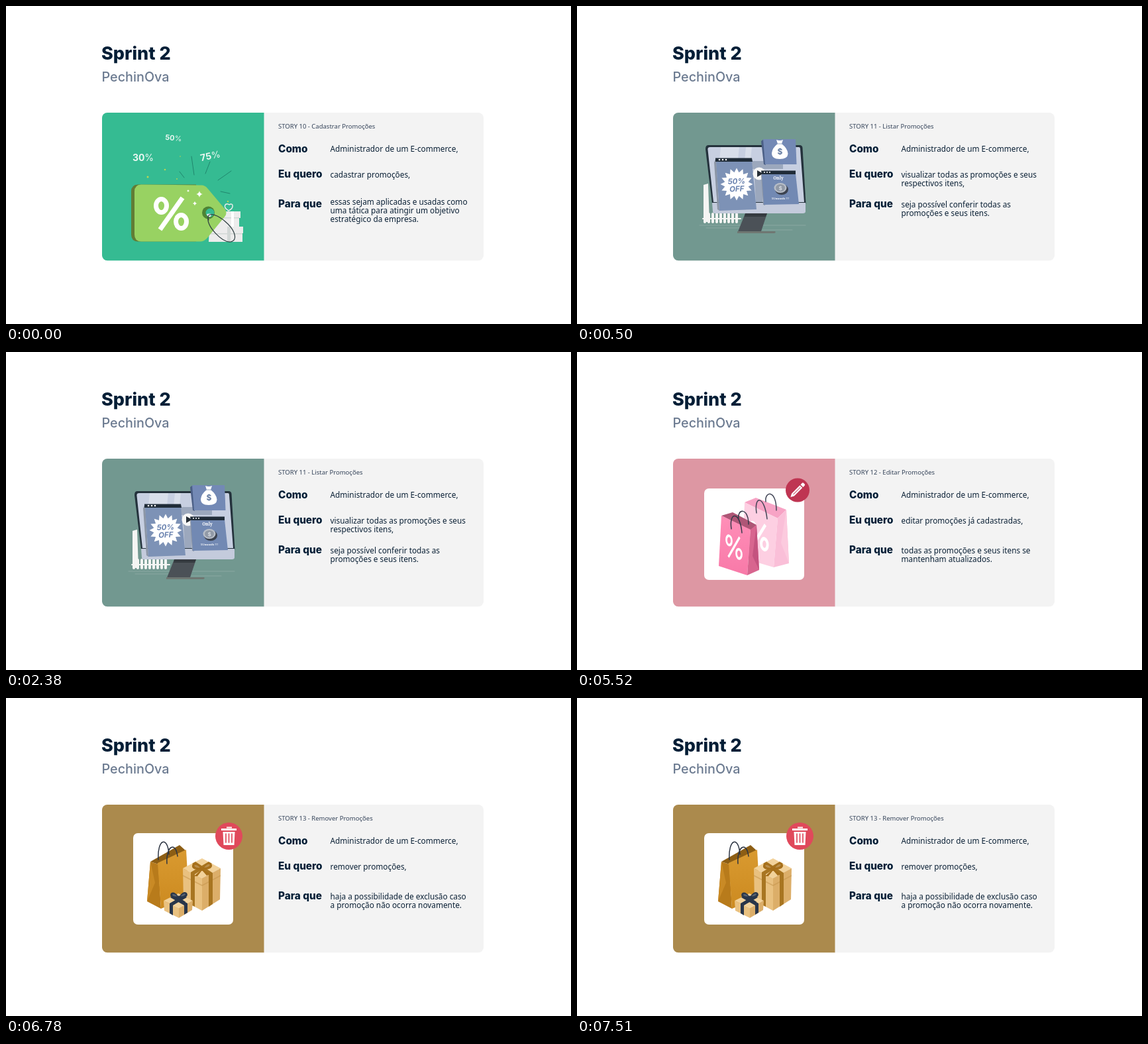
An HTML page for the animation above (8 s loop, 853x480 px).

```html
<!DOCTYPE html>
<html lang="pt">
<head>
<meta charset="utf-8">
<title>Sprint 2</title>
<style>
  html, body { margin: 0; width: 100%; height: 100%; overflow: hidden; background: #fff; }
  svg { display: block; width: 100%; height: 100%; }
  text { font: 11.8px "Noto Sans", sans-serif; fill: #0b2136; }
  text.title { font: 800 27px Inter, sans-serif; fill: #041e36; }
  text.sub { font: 500 19.8px Inter, sans-serif; fill: #6b7a90; }
  text.label { font: 800 15.3px Inter, sans-serif; fill: #041e36; }
  text.story { font-size: 9.5px; font-weight: 500; fill: #35445a; }
  .art text { font-family: Inter, sans-serif; text-anchor: middle; fill: #e9f7f1; }
  .art text.serif { font-family: "Noto Serif", serif; font-weight: 700; fill: #fff; }
  .art text.offer { font-size: 11.5px; font-style: italic; fill: #6c84b0; }
  .bold { font-weight: 700; }
  .line { fill: none; stroke-linecap: round; stroke-linejoin: round; }
  .scene { display: none; }
  .scene.on { display: inline; }
</style>
</head>
<body>
<svg viewBox="0 0 853 480">
  <defs>
    <clipPath id="card"><rect x="145" y="161" width="576" height="223.300" rx="8"/></clipPath>
    <linearGradient id="pink" x2="0" y2="1"><stop stop-color="#ff8fb8"/><stop offset="1" stop-color="#f879a8"/></linearGradient>
    <linearGradient id="gold" x2="0" y2="1"><stop stop-color="#d99a30"/><stop offset="1" stop-color="#cc8a20"/></linearGradient>
    <g id="percent" class="line" stroke="#fff">
      <ellipse cx="-15" cy="-12" rx="8" ry="10"/>
      <ellipse cx="15" cy="12" rx="8" ry="10"/>
      <path stroke-linecap="butt" d="M17-24L-17 24"/>
    </g>
    <path id="spark" fill="#fff" d="M0-5Q.8-.8 5 0Q.8.8 0 5Q-.8.8-5 0Q-.8-.8 0-5"/>
    <g id="bow">
      <path d="M0 0C-5-10-14-11-15-5C-16 1-7 2 0 0C5-10 13-12 15-6C16 0 7 2 0 0L-12 11L-7 11L0 2L7 10L12 8Z"/>
      <path fill="#fff" opacity=".22" d="M-3-2Q-9-8-12-5Q-10-1-3-2M3-2Q9-9 12-6Q10-2 3-2"/>
      <circle r="3"/>
    </g>
  </defs>

  <text class="title" x="144" y="81">Sprint 2</text>
  <text class="sub" x="144.500" y="114">PechinOva</text>

  <g clip-path="url(#card)">
    <path fill="#f3f3f3" d="M389 161h332v224h-332z"/>
    <path id="side" d="M145 161h244.500v224h-244.500z"/>
  </g>
  <text class="label" x="411" y="221">Como</text>
  <text class="label" x="411" y="259">Eu quero</text>
  <text class="label" x="411" y="304">Para que</text>
  <text x="489.5" y="219.5">Administrador de um E-commerce,</text>
  <g id="copy"></g>

  <g class="art">
    <!-- price tag -->
    <g class="scene">
      <g fill="#ececec">
        <path d="M302 308h28v27h-28zM325 310h29v10h-2v14h-25zM307 333h51v10h-1v13h-51z"/>
        <path class="line" stroke="#ececec" stroke-width="1.500" d="M336 309C325 302 333 296 337 300C343 296 345 305 336 309"/>
        <path fill="#d2d8d6" d="M327 319h25v1.500h-25zM309 343h48v1.500h-48zM334 333h5v23h-5z"/>
        <path fill="#fff" d="M340 310h4v23h-4z"/>
      </g>
      <path class="line" stroke="#1f8069" stroke-width=".9" d="M262 250l7 9M280 227l4 28M308 235l-7 18M340 249l-20 14M324 280l14 3"/>
      <g fill="#b9d653"><circle cx="214" cy="258" r="1.500"/><circle cx="240" cy="247" r="1.300"/><circle cx="258" cy="261" r=".9"/><circle cx="263" cy="227" r=".8"/><circle cx="335" cy="295" r="1.200"/></g>
      <path fill="#617c35" d="M199 269.500H287V355.500H199Q189 355 189 345V280Q189 270 199 269.500"/>
      <path fill="#98d262" d="M204 269.500L294 270.500Q300 270 304 275L331 307Q334 312 331 317L304 350Q299 355.500 293 355.500H204Q194 355 194 345V280Q194 270 204 269.500"/>
      <circle cx="305.500" cy="312" r="9.500" fill="#4e8335"/>
      <circle cx="308" cy="312" r="6.500" fill="#35bb92"/>
      <path fill="#ececec" d="M303 314q4-1 7 0l-1 4q-5 1-6-4"/>
      <path class="line" stroke="#2f3f42" stroke-width="1.200" d="M305 319C303 333 326 357 339 356C351 354 345 339 335 329C326 320 312 311 306 316Q304 319 306 323"/>
      <use href="#percent" transform="translate(249.500 313.500)" stroke-width="7"/>
      <use href="#spark" x="292" y="284"/>
      <use href="#spark" transform="translate(285 298) scale(.65)"/>
      <use href="#spark" transform="translate(275 279) scale(.4)"/>
      <text style="font-size:14px" x="207" y="234"><tspan class="bold">30</tspan>%</text>
      <text style="font-size:11px" transform="translate(252.500 203) rotate(6)"><tspan class="bold">50</tspan>%</text>
      <text style="font-size:14px" transform="translate(309.500 231) rotate(-12)"><tspan class="bold">75</tspan>%</text>
    </g>

    <!-- monitor with pop-ups -->
    <g class="scene">
      <path class="line" stroke="#91ada6" stroke-width=".8" d="M185 331h160M195 335h50M280 338h45"/>
      <path fill="#f4f5f3" d="M191 270l7-2 2 58h-9z"/>
      <path class="line" stroke="#f4f5f3" stroke-width="4" d="M193 314v12m6-12v12m6-12v12m6-12v12m6-12v12m6-12v12m6-12v12m6-12v12m6-12v12"/>
      <path class="line" stroke="#f4f5f3" stroke-width="2" d="M190 321h57"/>
      <path fill="#24323c" d="M198 210H336Q340 210 340.500 214L345.500 298H204L194 216Q194 210 198 210"/>
      <path fill="#c7cfe1" d="M201 213H335Q337 213 337 216L343 296H206L197.500 217Q197 213 201 213"/>
      <path fill="#d8deea" d="M217 213h28l-9 83h-27zM255 213h9l-9 83h-8z"/>
      <path fill="#9ca8bd" d="M264 234h47v12h-47zM267 246h13v50h-10z"/>
      <path fill="#c4cbdc" d="M204 297H345V310Q345 313 341 313H208Q205 313 205 310Z"/>
      <path fill="#4b5157" d="M254 313h33l-9 27-36 3z"/>
      <path fill="#353b40" d="M254 313h33l-2 5h-32z"/>
      <path fill="#6f7772" d="M242 340h57q2 2-1 3h-56z"/>

      <path fill="#8c96a6" d="M207 236l5 71 3 2-5-80z"/>
      <path fill="#7d92b6" d="M210 234h54l7 73-56 2z"/>
      <path fill="#202c38" d="M209 229.500h55l1 5.500h-56z"/>
      <g fill="#fff"><circle cx="215" cy="232" r="1.300"/><circle cx="220" cy="232" r="1.300"/><circle cx="225" cy="232" r="1.300"/></g>
      <polygon id="burst" fill="#fff"/>
      <g transform="rotate(-2 241 269)">
        <text class="offer bold" x="241" y="268.500">50%</text>
        <text class="offer bold" x="241" y="280">OFF</text>
      </g>

      <circle cx="275" cy="253" r="9.500" fill="#f6f6f6"/>
      <path fill="#252d35" d="M272 248l9 5-9 5z"/>

      <path fill="#4b5f86" d="M278 204l4-3 3 39-3-1z"/>
      <path fill="#7389b5" d="M281 201h49l1.500 38H284z"/>
      <path fill="#fff" d="M301 202q5 2 10 0l-2 6q9 7 9.500 15Q318 231 306 231Q294 231 294 222Q295 214 303 208Z"/>
      <path class="line" stroke="#9aa9c5" stroke-width="1" d="M302 208h8"/>
      <text class="bold" style="font-size:12px;fill:#60789f" x="306.500" y="224">$</text>

      <path fill="#8c96a6" d="M278 255l3 45 3 1-2-47z"/>
      <path fill="#7289b3" d="M279 253h51l5 46-53 1z"/>
      <path fill="#202c38" d="M278 248.500h52v5.500h-51z"/>
      <g fill="#fff"><circle cx="283" cy="251" r="1"/><circle cx="287" cy="251" r="1"/><circle cx="291" cy="251" r="1"/></g>
      <text class="serif" style="font-size:6.500px" x="304" y="262">Only</text>
      <ellipse cx="309" cy="277" rx="10" ry="8" fill="#3c4350"/>
      <ellipse cx="307" cy="274.500" rx="9.500" ry="7.500" fill="#b8bec8"/>
      <ellipse cx="307" cy="274.500" rx="7" ry="5.500" fill="#9199a6"/>
      <text class="bold" style="font-size:8px;fill:#d7dce3" x="307" y="277.500">$</text>
      <text class="serif" style="font-size:4.300px" x="307" y="292">15/month !!!</text>
    </g>

    <!-- pink bags -->
    <g class="scene">
      <rect x="192" y="206" width="151" height="138" rx="7" fill="#fff"/>
      <path fill="#f7a3c5" d="M253 227l17-7 46 18-13 13z"/>
      <path fill="#fdcfe2" d="M253 227l50 24-6 74-47-14z"/>
      <path fill="#fabfd8" d="M303 251l13-13 4 81-23 6z"/>
      <path fill="#fccade" d="M316 238l-8 50 12 31z"/>
      <use href="#percent" transform="matrix(.6 .15 -.01 .82 274 278)" stroke-width="6.500"/>
      <path class="line" stroke="#424657" stroke-width="1.500" d="M271 243C267 216 283 216 287 252M285 226C283 210 301 207 301 239"/>
      <path fill="#ae5676" d="M218 247l17-5 36 19-9 8z"/>
      <path fill="url(#pink)" d="M218 247l44 21-5 69-43-14z"/>
      <path fill="#d8658f" d="M262 268l9-7 4 68-18 8z"/>
      <path fill="#c4537f" d="M271 261l-6 47 10 21z"/>
      <use href="#percent" transform="matrix(.5 .12 0 .7 237 294.500)" stroke-width="5.500"/>
      <path class="line" stroke="#353949" stroke-width="1.500" d="M233 267C229 241 246 239 249 273M244 253C241 236 259 234 259 260"/>
      <circle cx="333" cy="208.500" r="18" fill="#bf3552"/>
      <g fill="#fff" transform="translate(333 208.500) rotate(-45)">
        <path d="M-15 0l5-2.700h17.500v5.400h-17.500zM9-2.700h3q2 0 2 1.700v2q0 1.700-2 1.700h-3z"/>
        <path fill="#bf3552" d="M-9-.4h15v.8h-15z"/>
      </g>
    </g>

    <!-- golden bag and gifts -->
    <g class="scene">
      <rect x="192" y="204" width="151" height="138" rx="7" fill="#fff"/>
      <path fill="#8d5e14" d="M218 247l44-25 10 9-42 20z"/>
      <path fill="#b87b1b" d="M218 247l12 4 4 67-21-11z"/>
      <path fill="#c98a25" d="M218 247l7 32-12 28z"/>
      <path fill="url(#gold)" d="M229 249l43-20 4 72-42 17z"/>
      <path class="line" stroke="#2c3442" stroke-width="1.500" d="M230 244C228 213 244 207 246 236M243 250C241 224 256 215 259 239"/>
      <path fill="#f2d29b" d="M267 257l29-15 28 15-28 15z"/>
      <path fill="#e9c180" d="M267 257l29 15v49l-28-15z"/>
      <path fill="#dcae69" d="M296 272l28-15-1 47-27 17z"/>
      <path fill="#c5954d" opacity=".55" d="M267 267l29 15 28-15v2l-28 15-29-15z"/>
      <path fill="#a87521" d="M279 263l6 3v49l-6-3zM306 267l6-3v47l-6 4zM279 263l27-16 5 3-26 16zM281 250l5-3 26 17-6 3z"/>
      <use href="#bow" fill="#a66f1a" x="296" y="258"/>
      <path fill="#f2d29b" d="M238 306l22-11 22 11-21 11z"/>
      <path fill="#e9c180" d="M238 306l23 11v15l-22-11z"/>
      <path fill="#dcae69" d="M261 317l21-11-1 14-20 12z"/>
      <path fill="#29364a" d="M247 310l5 3v15l-5-3zM269 313l5-3v14l-5 3zM247 310l21-12 5 3-21 12zM248 301l5-3 21 12-5 3z"/>
      <use href="#bow" fill="#29364a" transform="translate(261 301) scale(.85)"/>
      <circle cx="336.500" cy="208.500" r="20.500" fill="#e0495b"/>
      <path fill="#fff" d="M333 194.500h8v2h-8zM325 197h23v3h-23zM327.500 202h18l-1 20h-16z"/>
      <path class="line" stroke="#e0495b" stroke-width="1.700" d="M332 205v13M336.500 205v13M341 205v13"/>
    </g>
  </g>
</svg>
<script>
const LOOP = 8000;
const stories = [
  { start: 0, color: '#35bb92', name: 'STORY 10 - Cadastrar Promoções',
    want: ['cadastrar promoções,'], whyY: 300,
    why: ['essas sejam aplicadas e usadas como', 'uma tática para atingir um objetivo', 'estratégico da empresa.'] },
  { start: 500, color: '#729890', name: 'STORY 11 - Listar Promoções',
    want: ['visualizar todas as promoções e seus', 'respectivos itens,'], whyY: 304,
    why: ['seja possível conferir todas as', 'promoções e seus itens.'] },
  { start: 3640, color: '#dd97a3', name: 'STORY 12 - Editar Promoções',
    want: ['editar promoções já cadastradas,'], whyY: 304,
    why: ['todas as promoções e seus itens se', 'mantenham atualizados.'] },
  { start: 6780, color: '#ab8a4d', name: 'STORY 13 - Remover Promoções',
    want: ['remover promoções,'], whyY: 304,
    why: ['haja a possibilidade de exclusão caso', 'a promoção não ocorra novamente.'] },
];

const byId = id => document.getElementById(id);
const scenes = document.querySelectorAll('.scene');
const lines = (rows, y) =>
  rows.map((row, i) => `<text x="489.5" y="${y + 13 * i}">${row}</text>`).join('');

byId('burst').setAttribute('points', Array.from({ length: 32 }, (_, i) => {
  const r = i % 2 ? 18 : 24.5, a = i * Math.PI / 16;
  return [241 + r * Math.cos(a), 269 + r * Math.sin(a)];
}).join(' '));

let shown = -1;
function show(index) {
  if (index === shown) return;
  shown = index;
  const s = stories[index];
  byId('side').setAttribute('fill', s.color);
  byId('copy').innerHTML = `<text class="story" x="411" y="184.5">${s.name}</text>`
    + lines(s.want, 259) + lines(s.why, s.whyY);
  scenes.forEach((scene, i) => scene.classList.toggle('on', i === index));
}

function tick() {
  const t = performance.now() % LOOP;
  show(stories.findLastIndex(s => s.start <= t));
  requestAnimationFrame(tick);
}
tick();
</script>
</body>
</html>
```
